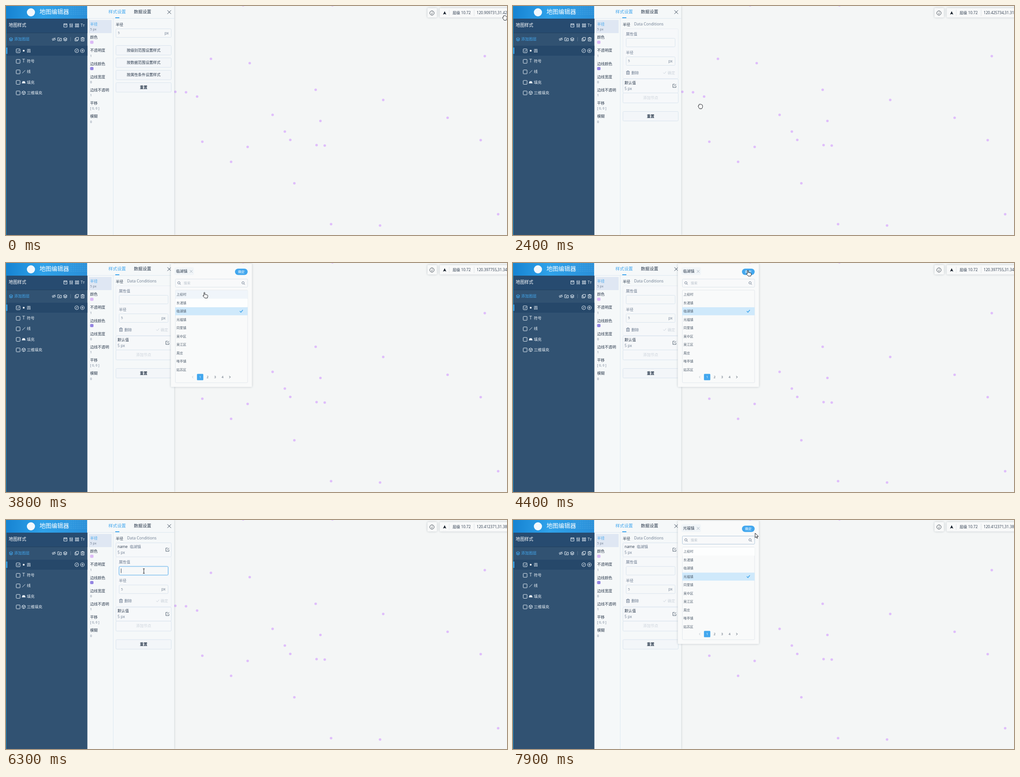
These frames come from a looping animation (1105x507 px, 8000 ms). An HTML page with a canvas:

```html
<!DOCTYPE html>
<html lang="zh-CN">
<head>
<meta charset="utf-8">
<style>
html, body { margin: 0; width: 1105px; height: 507px; overflow: hidden; }
canvas { display: block; }
</style>
</head>
<body>
<canvas width="1105" height="507"></canvas>
<script>
const ctx = document.querySelector('canvas').getContext('2d');
const FONT = '"Open Sans", "Noto Sans CJK SC", "Noto Sans CJK", sans-serif';
const INK = '#2b3a4d', SOFT = '#6c7b90', PALE = '#cdd4dc', BLUE = '#42a7ee';
const EDGE = '#d9e4ee', PANEL = '#f5f8f9', MAP = '#f4f6f6', WHITE = '#e8f0f7';
const LOOP = 8000;

const RING = 'M9.5 5A4.5 4.5 0 1 1 .5 5A4.5 4.5 0 1 1 9.5 5Z';
const ICON = {
  save: 'M1 1H9V9H1ZM3 1V4H7V1',
  sliders: 'M2 0V10M5 0V10M8 0V10M1 3H3M4 7H6M7 4H9',
  grid: 'M1 1H4V4H1ZM6 1H9V4H6ZM1 6H4V9H1ZM6 6H9V9H6Z',
  layers: 'M5 1L9.5 3.3 5 5.6 .5 3.3ZM.5 5.3L5 7.6 9.5 5.3M.5 7.3L5 9.6 9.5 7.3',
  eye: 'M.5 5Q5 .5 9.5 5Q5 9.5 .5 5ZM1.5 9L8.5 1',
  folder: 'M.5 1.5H4L5 2.8H9.5V9H.5ZM5 4.3V7.6M3.4 6H6.6',
  copy: 'M3 .7H9.3V7H3ZM3 3H.7V9.3H7V7',
  trash: 'M.5 2H9.5M3.5 2V.6H6.5V2M1.5 2V9.5H8.5V2M4 4V7.5M6 4V7.5',
  compass: RING + 'M3 7L7 3M4 4.5L5.5 6',
  target: RING + 'M5 2.5V7.5M2.5 5H7.5',
  info: RING + 'M5.4 4.4L4.7 7.6M5.7 2.4V3.2',
  edit: 'M6 1H1V9.5H9V5M4 6.5L9.5 .8',
  tick: 'M1 5L4 8 9 2',
  search: 'M7.5 4.2A3.4 3.4 0 1 1 .7 4.2A3.4 3.4 0 1 1 7.5 4.2ZM6.5 6.8L9.5 9.8',
  cube: 'M5 .5L9 2.7V7.3L5 9.5 1 7.3V2.7ZM1 2.7L5 5 9 2.7M5 5V9.5',
  cross: 'M1 1L9 9M9 1L1 9',
  line: 'M1 9L9 1',
  left: 'M6.5 1.5L3 5 6.5 8.5',
  right: 'M3.5 1.5L7 5 3.5 8.5',
  fill: 'M2.5 2.5H7.5L9.5 7.5H.5Z',
  north: 'M5 .5L9 9 5 7.2 1 9Z',
  shirt: 'M1 2L3.5 1 5 2.2 6.5 1 9 2 8.5 4.5H7.5V9H2.5V4.5H1.5Z'
};

const CURSOR = {
  arrow: 'M0 0V10.2L2.4 8 4 11.6 5.5 11 4 7.4H7.2Z',
  finger: 'M0 1Q1 -1 2 1V5L7 6Q9 6.5 8.5 9L7.5 13H2L-2.3 8.2Q-2 6.3 0 7.8Z',
  grab: 'M-4.5 .5Q-5.2 -1.8 -3 -1V-3.8Q-2 -5.4 -1 -4Q.2 -6 1.2 -4Q2.6 -5.2 3.2 -3.2Q5 -3.6 5 -1.6V2L3.2 5.5H-1.6Z',
  beam: 'M-2 -5H2M0 -5V5M-2 5H2'
};

// time, x, y, cursor shape until the next key
const PATH = [
  [0, 1100, 26, 'grab'], [500, 560, 208, 'grab'], [800, 392, 182, 'grab'],
  [900, 334, 172, 'finger'], [1200, 332, 154, 'finger'], [1400, 332, 154, 'finger'],
  [1800, 374, 215, 'grab'], [2200, 416, 248, 'grab'], [2300, 416, 248, 'grab'],
  [2400, 413, 222, 'grab'], [2600, 371, 172, 'arrow'], [2900, 306, 82, 'beam'],
  [3200, 306, 82, 'finger'], [3300, 383, 95, 'finger'], [3600, 383, 97, 'finger'],
  [4100, 517, 16, 'finger'], [4500, 517, 16, 'grab'], [4900, 393, 108, 'arrow'],
  [5000, 342, 146, 'arrow'], [5100, 343, 145, 'arrow'], [5300, 343, 145, 'arrow'],
  [5600, 304, 122, 'finger'], [5900, 304, 122, 'beam'], [6200, 304, 113, 'beam'],
  [6600, 304, 113, 'finger'], [7000, 374, 117, 'finger'], [7300, 376, 118, 'finger'],
  [7800, 500, 66, 'arrow'], [7900, 534, 29, 'arrow']
];

// time, longitude, latitude
const GEO = [
  [0, 120.909731, 31.4291], [500, 120.529837, 31.3172], [800, 120.41059, 31.3351],
  [2399, 120.41059, 31.3351], [2400, 120.425734, 31.3113], [2600, 120.397755, 31.3432],
  [4599, 120.397755, 31.3432], [4600, 120.478, 31.4213], [4900, 120.412371, 31.3815]
];

const DOTS = [
  [452, 117], [537.5, 126.5], [1056, 111], [373.5, 190], [397, 191], [421.5, 200.5],
  [683, 185.5], [832, 208], [588, 241], [693.5, 254.5], [974, 247.5], [615, 278],
  [627, 296.5], [433, 300.5], [533, 312], [685, 308], [703, 309], [1047, 297],
  [496.5, 345], [636, 392.5], [1085.5, 461], [717, 483], [825, 486], [523, -1.5], [720, -1.5]
];

const TOWNS = ['上经村', '东渚镇', '临湖镇', '光福镇', '同里镇', '吴中区', '吴江区', '周庄', '唯亭镇', '姑苏区'];

const within = (t, from, to) => t >= from && t < to;

function sample(keys, t) {
  const i = keys.findLastIndex(k => k[0] <= t);
  const a = keys[i], b = keys[i + 1] || a;
  const f = b === a ? 0 : (t - a[0]) / (b[0] - a[0]);
  return [a[1] + (b[1] - a[1]) * f, a[2] + (b[2] - a[2]) * f, a[3]];
}

function text(s, x, y, color = INK, size = 8.4, align = 'left', weight = 400) {
  ctx.font = `${weight} ${size}px ${FONT}`;
  ctx.textAlign = align;
  ctx.textBaseline = 'middle';
  ctx.fillStyle = color;
  ctx.fillText(s, x, y + .4);
}

function box(x, y, w, h, fill, stroke, r = 2) {
  ctx.beginPath();
  ctx.roundRect(x + .5, y + .5, w - 1, h - 1, r);
  if (fill) { ctx.fillStyle = fill; ctx.fill(); }
  if (stroke) { ctx.strokeStyle = stroke; ctx.lineWidth = 1; ctx.stroke(); }
}

function rect(x, y, w, h, fill) {
  ctx.fillStyle = fill;
  ctx.fillRect(x, y, w, h);
}

function disc(x, y, r, fill) {
  ctx.beginPath();
  ctx.arc(x, y, r, 0, 7);
  ctx.fillStyle = fill;
  ctx.fill();
}

function shadowed(draw, blur = 4) {
  ctx.save();
  ctx.shadowColor = 'rgba(40,60,80,.28)';
  ctx.shadowBlur = blur;
  draw();
  ctx.restore();
}

// icons are centred on x, y
function icon(name, x, y, color, size = 9, solid = false, weight = 1) {
  const path = new Path2D(ICON[name]), k = size / 10;
  ctx.save();
  ctx.translate(x - size / 2, y - size / 2);
  ctx.scale(k, k);
  ctx.lineWidth = weight / k;
  ctx.strokeStyle = ctx.fillStyle = color;
  solid ? ctx.fill(path) : ctx.stroke(path);
  ctx.restore();
}

function drawMap(t) {
  rect(0, 0, 1105, 507, MAP);
  for (const [x, y] of DOTS) disc(x, y, 2.8, '#dfbefb');
  shadowed(() => {
    box(929, 4, 22, 22, '#f8f9f9');
    box(956, 4, 160, 22, '#f8f9f9');
  });
  icon('info', 939.5, 15.5, '#333d48', 10.5);
  icon('north', 967.5, 15.5, '#16202c', 9, true);
  rect(977, 8, 1, 14, '#e0e4e8');
  rect(1032, 8, 1, 14, '#e0e4e8');
  text('层级 10.72', 985, 15, INK, 8.3);
  const [lon, lat] = sample(GEO, t);
  text(`${lon.toFixed(6)},${lat.toFixed(6)}`, 1038, 15, INK, 8.2);
}

function drawHeader() {
  const g = ctx.createLinearGradient(0, 0, 179, 10);
  g.addColorStop(0, '#1683d2');
  g.addColorStop(.45, '#2fa2ea');
  g.addColorStop(1, '#2a8fd8');
  rect(0, 0, 179, 28, g);
  for (let i = 0; i < 60; i++) disc(133 + i % 12 * 4, 2 + Math.floor(i / 12) * 4, .7, 'rgba(150,215,255,.5)');
  disc(55, 14, 9, '#f2f8fd');
  text('地图编辑器', 74, 13.5, '#fff', 13);
}

function drawSidebar() {
  rect(0, 28, 179.5, 479, '#315272');
  rect(0, 28, 179.5, 31, '#274b70');
  rect(0, 59, 179.5, 1, '#20405f');
  rect(0, 88, 179.5, 22, '#26486a');
  drawHeader();
  rect(0, 0, 1, 507, '#1b8fc2');
  rect(1, 92, 2, 14, BLUE);

  text('地图样式', 6, 43, '#fff', 9.7);
  ['save', 'sliders', 'grid'].forEach((n, i) => icon(n, 131 + i * 12.8, 43, WHITE));
  text('Tт', 169, 43, WHITE, 9, 'center');
  icon('layers', 11, 73.5, BLUE);
  text('添加图层', 18, 73.5, BLUE, 8.5);
  ['eye', 'folder', 'layers'].forEach((n, i) => icon(n, 105.5 + i * 12.6, 73.5, WHITE));
  rect(142, 69, 1, 9, '#58738f');
  icon('copy', 156, 73.5, WHITE);
  icon('trash', 169, 73.5, WHITE);
  icon('compass', 156, 99, WHITE);
  icon('target', 168.5, 99, WHITE);

  ['圆', '符号', '线', '填充', '三维填充'].forEach((name, i) => {
    const y = 99 + i * 23.3;
    box(22, y - 4.5, 9.5, 9.5, null, WHITE, 1);
    text(name, 46, y, '#f1f6fa', 8.5);
    if (i === 0) { icon('tick', 27, y, WHITE, 6.5); disc(39, y, 2, '#fff'); }
    if (i === 1) text('T', 39, y, WHITE, 10.5, 'center');
    if (i === 2) icon('line', 39, y, WHITE, 8);
    if (i === 3) icon('fill', 39, y, WHITE, 9.5, true);
    if (i === 4) icon('cube', 39, y, WHITE);
  });
}

function drawProperties() {
  shadowed(() => rect(179, 0, 192, 507, PANEL));
  rect(180, 27, 191, 1, '#dde8f1');
  rect(236, 27, 1, 480, '#dde8f1');
  text('样式设置', 226, 13.5, BLUE, 9.6);
  text('数据设置', 282, 13.5, INK, 9.6);
  rect(241, 25, 9, 2, BLUE);
  icon('cross', 360, 13.5, INK, 10);

  rect(183, 31, 50, 29, '#dfe7f3');
  const rows = [['半径', '5 px'], ['颜色', '#dcbaf6'], ['不透明度', '1'], ['边线颜色', '#9485e2'],
    ['边线宽度', '0'], ['边线不透明', '1'], ['平移', '[ 0, 0 ]'], ['模糊', '0']];
  rows.forEach(([name, value], i) => {
    const y = 40.5 + i * 29.2;
    text(name, 185.5, y, i ? INK : BLUE, 8.4);
    if (value[0] === '#') box(185, y + 6.5, 8.5, 8, value, null, 2);
    else text(value, 185.5, y + 11.5, SOFT, 7.2);
  });
}

function button(label, y, weight = 400) {
  box(242, y, 123, 22, '#f3f6f9', EDGE);
  text(label, 303.5, y + 11, INK, 8.3, 'center', weight);
}

function field(x, y, w, value, unit, focused) {
  if (focused) box(x - 1, y - 1, w + 2, 22, null, '#d7eafa', 3);
  box(x, y, w, 20, '#f6f8f9', focused ? '#62b1ea' : EDGE);
  if (focused) rect(x + 4.5, y + 5, 1, 10, INK);
  text(value, x + 4.5, y + 10, SOFT, 7.6);
  if (unit) text(unit, x + w - 6, y + 10, SOFT, 8.4, 'right');
}

function drawItem(y, name, detail) {
  box(242, y, 123, 32, '#f6f8fa', EDGE);
  text(name, 246, y + 9.5);
  if (detail) text(detail, 273, y + 9.5, SOFT, 8.3);
  text('5 px', 246, y + 22, SOFT, 8.4);
  icon('edit', 356, y + 15.5, '#455465', 8.5, false, .9);
}

function drawForm(y, value, focused) {
  box(242, y, 123, 111, '#f6f8fa', '#e8eef4');
  text('属性值', 249, y + 12.5, SOFT);
  field(249, y + 21, 109, value, '', focused);
  text('半径', 249, y + 53, SOFT);
  field(249, y + 62, 109, '5', 'px');
  icon('trash', 253.5, y + 97.5, SOFT, 8.5);
  text('删除', 261, y + 98, SOFT);
  const color = value ? INK : PALE;
  icon('tick', 334.5, y + 97.5, color, 8);
  text('确定', 341, y + 98, color);
}

function drawStyle(t) {
  text('半径', 242, 41);
  if (t < 2400) {
    field(242, 50, 123, '5', 'px');
    ['按级别范围设置样式', '按数据范围设置样式', '按属性条件设置样式', '重置']
      .forEach((label, i) => button(label, 87 + i * 27.4, i === 3 ? 600 : 400));
    return;
  }
  text('Data Conditions', 267, 40.5, SOFT, 8.7);
  const saved = t >= 5300, editing = t < 5300 || t >= 5800;
  let y = 50;
  if (saved) { drawItem(y, 'name', '临湖镇'); y += 31.4; }
  if (editing) {
    const focused = within(t, 3000, 3600) || within(t, 6300, 7300);
    drawForm(y, within(t, 4500, 5300) ? '临湖镇' : '', focused);
    y += 111;
  }
  drawItem(y, '默认值');
  box(242, y + 31, 123, 23, '#f6f8fa', EDGE);
  text('添加节点', 303.5, y + 42.5, editing ? PALE : INK, 8.4, 'center');
  button('重置', y + 72, 600);
}

function drawPopup(t) {
  if (!within(t, 3300, 4500) && t < 6600) return;
  const picked = within(t, 3600, 4500) ? '临湖镇' : t >= 7300 ? '光福镇' : '';
  const top = picked ? 4.5 : 0;
  const height = picked ? 274 : 282;
  shadowed(() => box(363, 1, 180, height, '#f9fafa', null, 2));
  const pillY = 17.2 + top / 2;
  box(504.5, pillY - 7.5, 29, 15, BLUE, null, 7);
  text('确定', 519, pillY, '#fff', 7.2, 'center');
  if (picked) {
    box(371, 9, 44, 18, '#f1f5f8');
    text(picked, 375, 18.5);
    icon('cross', 408.5, 18.5, '#a4b0bc', 7);
  }

  const searchTop = picked ? 35 : 31;
  box(373, searchTop, 160.5, 19, '#f8f9fa', t >= 7900 ? '#b2c8dc' : '#dce4eb');
  icon('search', 382, searchTop + 9.5, SOFT, 7.5);
  icon('search', 523.5, searchTop + 9.5, SOFT, 7.5);
  text('搜索', 392, searchTop + 9.5, '#b9c2cc', 7.4);

  const listTop = 55 + top;
  box(373, listTop, 160.5, picked ? 206 : 218.5, null, '#e2e7ec');
  for (const [lag, color] of [[100, '#fdfefe'], [0, '#f0f5fa']]) {
    const [x, y] = sample(PATH, t - lag);
    const row = Math.floor((y - listTop - 1) / 18.5);
    if (x > 372 && row >= 0 && row < 10) rect(373.5, listTop + 1.3 + row * 18.5, 159.5, 18, color);
  }
  TOWNS.forEach((name, i) => {
    const y = listTop + 10.5 + i * 18.5;
    if (name === picked) {
      rect(373, y - 9, 160, 17.7, '#cfe9fb');
      icon('tick', 519, y - .5, BLUE, 8.5, false, 1.6);
    }
    text(name, 376, y, '#4d5b6b', 7.2);
  });

  const pageY = listTop + 193;
  icon('left', 412, pageY, '#b6bec7', 6.5);
  icon('right', 493.5, pageY, INK, 6.5);
  box(420.7, pageY - 7.5, 15, 15, BLUE, null, 1.5);
  for (let n = 1; n < 5; n++) text(n, 411.7 + n * 16.5, pageY, n > 1 ? '#4d5b6b' : '#fff', 7.4, 'center');

  if (within(t, 3300, 3600) || within(t, 6600, 6900)) {
    const a = t / 160;
    ctx.beginPath();
    ctx.arc(452.5, 268, 4.4, a, a + 5);
    ctx.strokeStyle = BLUE;
    ctx.lineWidth = 1;
    ctx.stroke();
  }
}

function drawInputBar(t) {
  if (!within(t, 3100, 3700) && !within(t, 6500, 7400)) return;
  box(1067, 474, 60, 30, '#d0ebf2', '#8798a3', 5);
  ctx.save();
  const face = new Path2D('M1120 477H1078L1073 489 1078 501H1120Z');
  ctx.fillStyle = '#f5f4f3';
  ctx.fill(face);
  ctx.setLineDash([2, 2]);
  ctx.strokeStyle = '#d9a3a6';
  ctx.stroke(face);
  ctx.restore();
  icon('shirt', 1095, 485, '#81797b', 7.5, true);
  text('中', 1082, 493.5, '#6c7075', 8);
  text('简', 1101, 493.5, '#6c7075', 8);
}

function drawCursor(t) {
  const [x, y, shape] = sample(PATH, t);
  const path = new Path2D(CURSOR[shape]);
  ctx.save();
  ctx.translate(x, y);
  ctx.lineJoin = 'round';
  ctx.lineWidth = 1;
  ctx.fillStyle = '#fff';
  ctx.strokeStyle = '#1c1f24';
  if (shape !== 'beam') ctx.fill(path);
  ctx.stroke(path);
  ctx.restore();
}

function frame(now) {
  const t = Math.floor(now % LOOP / 100) * 100;
  drawMap(t);
  drawProperties();
  drawStyle(t);
  drawSidebar();
  drawPopup(t);
  drawInputBar(t);
  drawCursor(t);
  requestAnimationFrame(frame);
}
requestAnimationFrame(frame);
</script>
</body>
</html>
```
